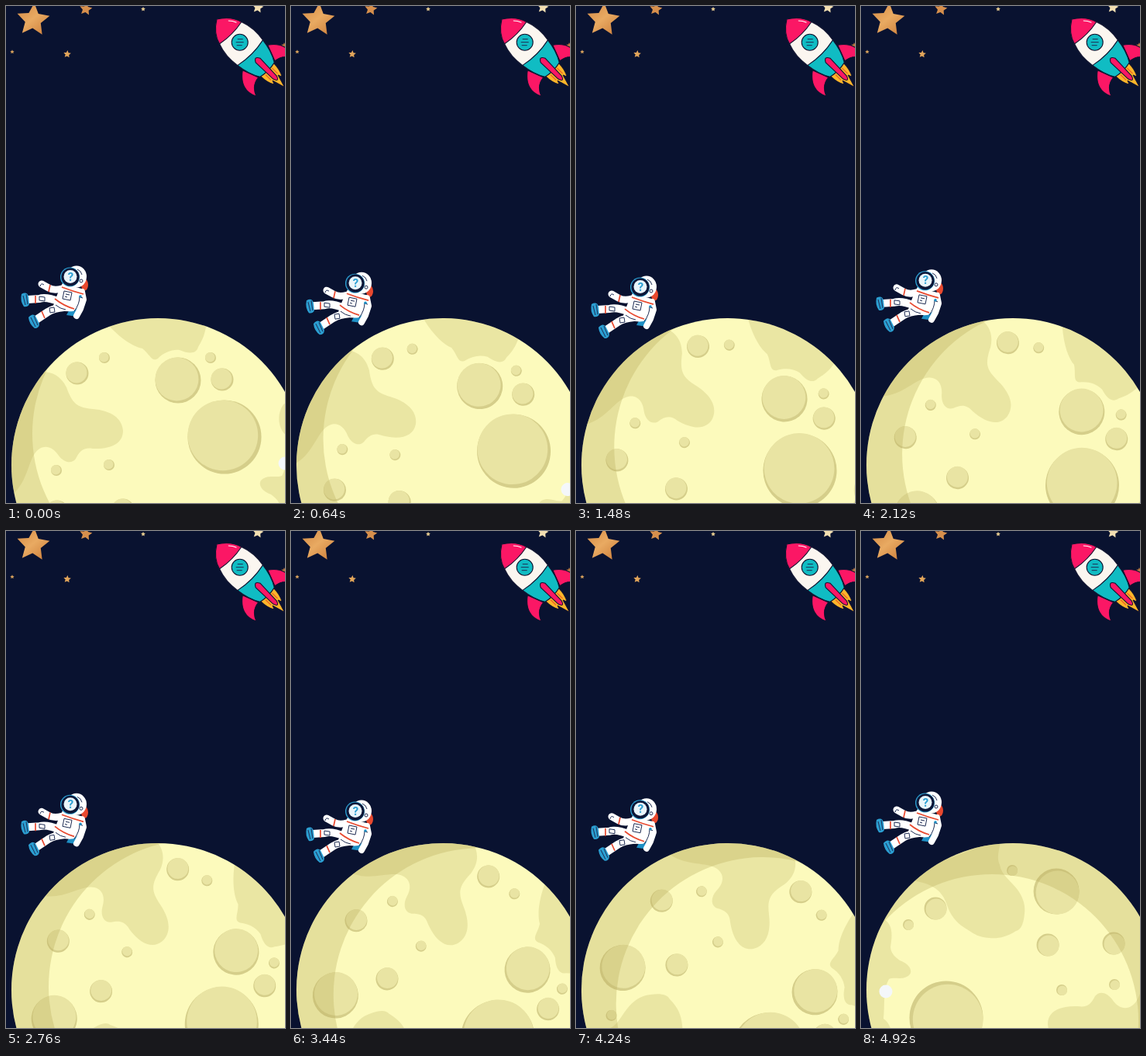
An HTML page that plays this animation: 360x640 px, repeating every 4960 ms.

```html
<!DOCTYPE html>
<html lang="en">
<head>
<meta charset="utf-8">
<title>Moon and astronaut</title>
<style>
  html, body { margin: 0; width: 100%; height: 100%; overflow: hidden; background: #091230; }
  svg { display: block; width: 360px; height: 640px; }
  .shade { fill: #b9af60; fill-opacity: .28; }
  .night { fill: #b9af60; fill-opacity: .35; }
  .ink { stroke: #10122e; stroke-width: 1.1; stroke-linejoin: round; }
  .limb { fill: none; stroke: #fff; stroke-linecap: round; stroke-linejoin: round; }
  .band { fill: none; stroke: #e8492f; stroke-width: 1.7; }
  .seam { fill: none; stroke: #1d2b52; stroke-width: 1; }
</style>
</head>
<body>
<svg viewBox="0 0 360 640">
  <defs>
    <clipPath id="disc"><circle r="189"/></clipPath>
    <linearGradient id="copper" x2="1" y2="1">
      <stop stop-color="#d08542"/><stop offset=".5" stop-color="#e9aa62"/><stop offset="1" stop-color="#cb7d39"/>
    </linearGradient>
  </defs>

  <g id="stars"></g>

  <g id="rocket" transform="translate(272 17) rotate(-45)">
    <path class="ink" fill="#fcb62a" d="M-12 91Q-12 104-7 112L-5 107 0 124 5 107 7 112Q12 104 12 91Z"/>
    <path fill="none" stroke="#ef6a26" stroke-width="1.5" d="M-6 95V105M6 95V105"/>
    <path class="ink" fill="#fb1765" d="M-23 70C-37 80-41 93-34 106C-31 98-26 92-15 91ZM23 70C37 80 41 93 34 106C31 98 26 92 15 91Z"/>
    <path class="ink" fill="#fbf6f0" d="M0 0C-10 6-17 14-20 25C-25 38-25 50-23 62Q0 68 23 62C25 50 25 38 20 25C17 14 10 6 0 0Z"/>
    <path class="ink" fill="#fb1765" d="M0 0C-10 6-17 14-20 25Q0 29 20 25C17 14 10 6 0 0Z"/>
    <path class="ink" fill="#10bcc3" d="M-23 61Q0 66 23 61Q21 79 13 92Q0 95-13 92Q-21 79-23 61Z"/>
    <path class="ink" fill="#fb1765" d="M-4 75Q0 67 4 75L3 106Q0 115-3 106Z"/>
    <circle class="ink" r="10.5" cy="42" fill="#10bcc3"/>
    <path class="seam" d="M-5 42L5 42M-4 46L3 46M-3 38L4 38" transform="rotate(45 0 42)"/>
    <path fill="none" stroke="#fff" d="M9 12Q13 16 15 21"/>
  </g>

  <g id="moon">
    <circle r="189" fill="#fcfabc"/>
    <g clip-path="url(#disc)">
      <g class="shade">
        <path d="M-160-118C-145-122-128-120-118-100C-110-78-104-74-84-72C-60-70-46-60-45-44C-45-28-60-20-84-21C-96-23-101-18-106-8C-112 0-122-4-128-12C-136-24-146-26-154-20C-168-10-166 22-190 40L-230 0Z"/>
        <path d="M-70-195L-62-178C-45-160-30-152-20-150C-10-142-8-132 0-137C8-145 18-149 28-148C42-142 50-144 52-152C60-165 62-172 64-195Z"/>
        <path d="M190 105L166 91C156 84 155 74 158 55C157 46 151 42 146 38C130 32 130 22 134 19C142 12 152 17 160 14C168 0 165-20 167-37C156-44 152-64 162-78L195-100Z"/>
        <path d="M16 195C17 180 22 172 17 161C15 148 2 140-6 129C-14 118-16 108-15 99C-14 85-10 77-4 76C10 67 20 66 31 67C44 68 50 72 56 76C70 84 79 92 85 109C91 128 103 134 116 138L145 145Z"/>
      </g>
      <g id="craters"></g>
      <path class="night" fill-rule="evenodd" d="M-200-200H200V200H-200ZM-162-40a189 189 0 1 0 378 0a189 189 0 1 0-378 0Z"/>
    </g>
    <circle cx="164" cy="-2" r="8.5" fill="#f4f7fa"/>
  </g>

  <g id="astronaut">
    <ellipse cx="101.5" cy="359" rx="4.500" ry="7.500" fill="#e8492f"/>
    <path d="M98 366Q107 376 100 388L92 400 78 398 90 376Z" fill="#1e8fc4"/>
    <path class="limb" stroke-width="9" d="M72 364Q62 367 55 363L46 358"/>
    <path class="limb" stroke-width="10" d="M69 381Q52 374 43 377L28 378M75 388Q62 389 54 394L39 404"/>
    <path d="M73 357Q86 361 101 365L102 376Q95 388 87 393Q73 395 61 386Q66 370 73 357Z" fill="#fff"/>
    <path class="limb" stroke-width="8" d="M98 368L100 378 96 390 91 399"/>
    <path class="seam" d="M95 374Q95 384 88 393M64 385Q70 390 77 391"/>
    <path d="M20 371Q27 367 29 374L30 384Q28 388 23 387Q18 380 20 371ZM29 401Q34 395 38 399L43 409Q43 415 37 415Q30 410 29 401Z" fill="#2b9fd2"/>
    <path class="seam" d="M22 373L25 385M26 371L28 384M32 401L38 413M36 399L41 411M44 361Q45 356 49 359M43 374L50 375 50 380 43 379ZM56 389L62 388 63 394 57 395Z"/>
    <path class="band" d="M57 359L55 368M38 373L38 383M46 393L50 402M72 362Q85 367 100 371M63 377Q74 386 88 390"/>
    <path class="seam" d="M75 367L85 369 83 379 73 377ZM77 371L82 372M76 374L79 375M96 375L99 376"/>
    <ellipse cx="91" cy="348.500" rx="13" ry="14" fill="#fff"/>
    <circle cx="82.500" cy="349" r="12.500" fill="#2b9fd2"/>
    <circle cx="83" cy="349" r="11.600" fill="#0d1738"/>
    <circle cx="83" cy="348.500" r="8.500" fill="#e9f5fb"/>
    <text x="83.500" y="353.500" text-anchor="middle" font-family="Inter, sans-serif" font-size="14" font-weight="700" fill="#2b9fd2">?</text>
    <circle class="seam" cx="97" cy="354" r="2"/>
    <circle cx="96" cy="374" r="1.800" fill="#1e8fc4"/>
    <path class="seam" d="M92 339Q97 341 98 346"/>
  </g>
</svg>
<script>
const LOOP = 4960, SPIN = 18.4 / 1000, SPIN_OUT = 4480, LAST = 4920;
const el = id => document.getElementById(id);

// x, y, outer radius, tilt, fill
const stars = [
  [35, 18, 22, 4, 'url(#copper)'], [103, 4, 8.5, 8, '#d68f4c'], [177, 4, 3, 0, '#e6cb90'],
  [8, 59, 2.8, 0, '#d9a25c'], [79, 62, 5, 5, '#e3a65a'], [325, 2, 7.5, 8, '#f3dfb2'], [359, 51, 4, 0, '#b8793f']
];
el('stars').innerHTML = stars.map(([x, y, r, tilt, fill]) => {
  const points = Array.from({ length: 10 }, (_, i) => {
    const a = i * Math.PI / 5, d = i % 2 ? r * .48 : r;
    return [d * Math.sin(a), -d * Math.cos(a)].map(v => v.toFixed(2));
  });
  return `<polygon points="${points.join(' ')}" fill="${fill}" transform="translate(${x} ${y}) rotate(${tilt})"/>`;
}).join('');

// x, y, radius around the moon's centre
const craters = [
  [86, -36, 47.5], [26, -109, 29.5], [-56, 127, 29.5],
  [83, -110, 14.5], [-104, -118, 14.5], [-45, 58, 14.5], [-130, 60, 14.5], [100, 105, 14.5],
  [68, -138, 7], [-69, -138, 7], [-131, 7, 7], [-63, 0, 7], [1, 154, 7], [135, 84, 7]
];
el('craters').innerHTML = craters.map(([x, y, r]) => {
  const d = .5 + r * .035;
  return `<circle cx="${x}" cy="${y}" r="${r}" fill="#d5ce8a"/>` +
    `<circle cx="${x - d}" cy="${y - d}" r="${r - d}" fill="#e9e4a3"/>`;
}).join('');

function draw(now) {
  const t = now % LOOP;
  const out = Math.min(1, Math.max(0, (t - SPIN_OUT) / (LAST - SPIN_OUT)));
  const angle = t * SPIN + 89.5 * out ** 3;
  const phase = t / 2500 % 1;
  const bob = 16 * (1 - Math.abs(1 - 2 * phase));
  el('moon').setAttribute('transform', `translate(196 591) rotate(${angle})`);
  el('astronaut').setAttribute('transform', `translate(0 ${bob})`);
}

let start;
function tick(now) {
  start ??= now;
  draw(now - start);
  requestAnimationFrame(tick);
}
draw(0);
requestAnimationFrame(tick);
</script>
</body>
</html>
```
